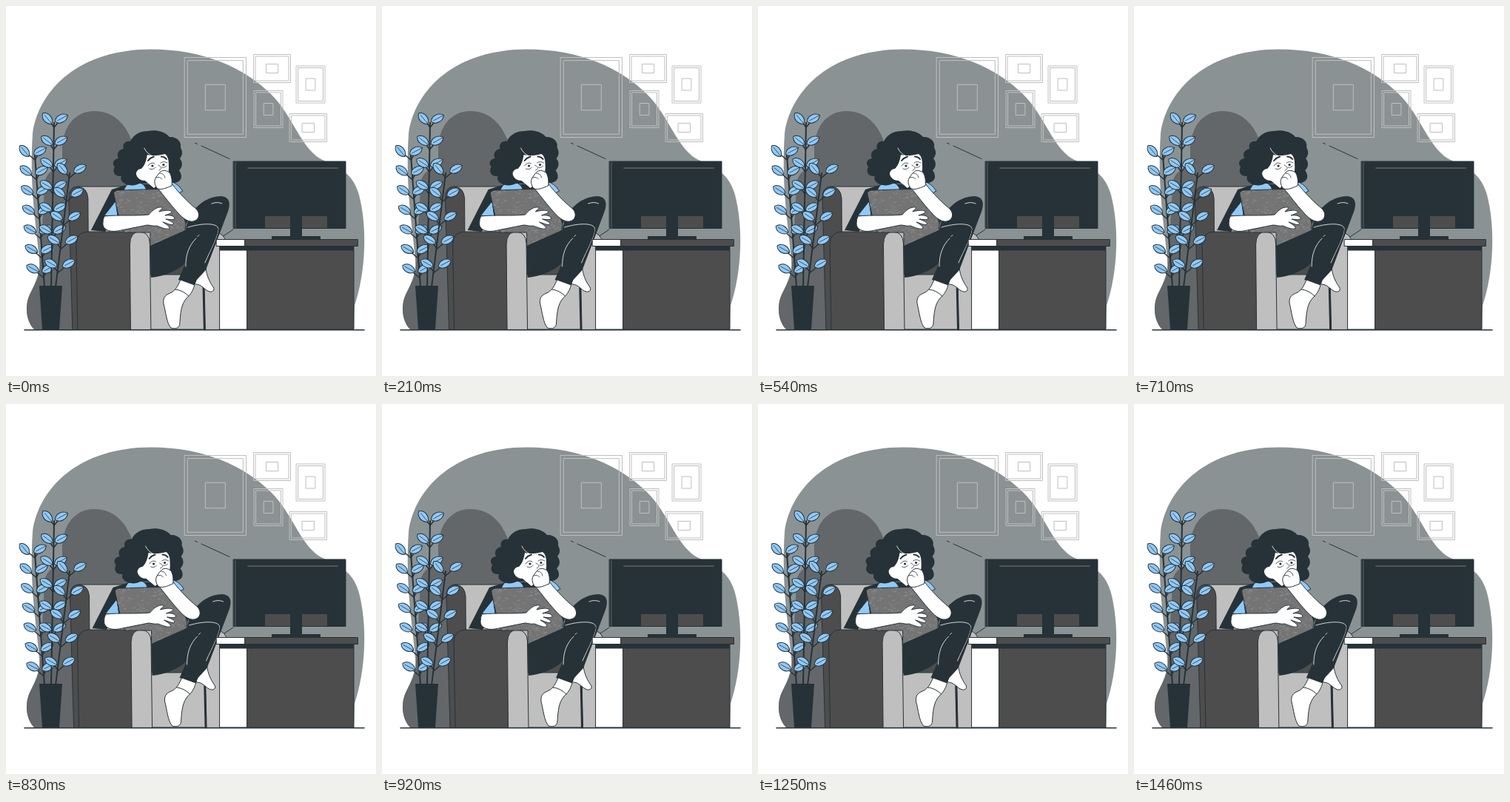
These frames come from a looping animation (500 by 500 pixels, 1.5 s). An HTML page:

```html
<!DOCTYPE html>
<html lang="en">
<head>
<meta charset="utf-8">
<title>Scary film night</title>
<style>
  html, body { margin: 0; height: 100%; overflow: hidden; background: #fff; }
  svg { display: block; width: 100vw; height: 100vh; stroke-linecap: round; stroke-linejoin: round; }
  .ink { fill: #263238; }
  .dark { fill: #4d4d4d; }
  .light { fill: #bfbfbf; }
  .white { fill: #fff; }
  .blue { fill: #90caf9; }
  .edge { stroke: #263238; }
  .line { fill: none; stroke: #263238; }
  .shine { fill: none; stroke: #fff; stroke-width: .8; }
</style>
</head>
<body>
<svg viewBox="0 0 500 500">
  <clipPath id="blobClip"><use href="#blob"/></clipPath>
  <clipPath id="pillowClip"><use href="#pillow"/></clipPath>

  <path id="blob" fill="#8b9294" d="M36 172C45 111 101 58.500 196 58.500C268 58.500 323 84 359 120C387 148 398 190 424 206C447 218 468 223 477 255C488 297 487 357 471 405L470 437H38C27 426 25 405 32 390C41 372 46 362 45 345C42 300 31 250 36 172Z"/>
  <path clip-path="url(#blobClip)" fill="#636769" d="M76 202C74 164 93 142 119 142C149 142 166 164 174 195L190 260V437H20V390C38 372 46 366 46 350L52 245C52 228 61 219 77 219Z"/>
  <g id="pictures" fill="none" stroke="#bfbfbf"></g>
  <path class="line" d="M255.500 185l3 1.500M264 189l38 17.500M307 302l-15 10"/>

  <g id="shaker">
    <g id="chair" class="edge">
      <path class="light" d="M96 244H170L200 300V437H108Z"/>
      <path class="dark" d="M90 437L85 262Q84 244 97 244Q110 245 111 260L112 437Z"/>
      <path class="light" d="M194 358H270V437H194Z"/>
      <path class="dark" d="M194 330H256V363H194Z"/>
      <path class="light" d="M269 437L267 322Q269 306 283 306Q296 307 297 320V437Z"/>
      <path class="line" stroke-width="3" d="M267 372L268.500 437"/>
      <path class="dark" d="M97 437L95 322Q96 305 111 305H181V437Z"/>
      <path class="light" d="M168.500 437L167.500 322Q168 305 181 305Q194 306 194.500 321L196 437Z"/>
    </g>

    <g id="body">
      <path class="ink" d="M143 248L115 303L134 305L150 284L196 306L238 304L246 290L222 240L165 241Z"/>
      <path class="blue edge" d="M148 264L133 283L151 285Z"/>
      <path class="blue edge" d="M159 250C162 239 171 236 179 238C186 240 190 245 190 251Z"/>
      <path class="blue edge" d="M222 237Q232 239 239 250L228 256Z"/>
    </g>

    <g id="head">
      <path class="ink" d="M168 183C173 173 182 169 192 169C202 167 214 169 221 177C230 176 238 183 236 191C239 197 239 201 235 206C240 212 238 219 234 222C240 230 237 238 228 239L180 240C173 244 162 243 157 237C155 235 155 232 156 230C148 231 143 225 147 217C143 213 145 207 152 206C149 199 153 194 159 193C157 187 161 182 168 183Z"/>
      <path class="white" d="M191 201C198 203 208 202 215 200C219 203 220 208 220 214C221 228 217 236 207 240L200 246L188 236C181 236 176 231 176 226C177 222 180 220 183 220C188 215 190 208 191 201Z"/>
      <path class="shine" stroke-width="1.200" d="M187 192Q190 199 198 203"/>
      <path class="line" stroke-width="2" d="M192 209Q195 205 200 203.500M210 203.500Q215 204 217 207"/>
      <path class="line" stroke-width=".8" d="M192 216Q196 210 201 213M194 220Q199 222 202 218M209 212Q213 209 218 212M211 218Q215 219 217 216M206 215C210 217 212 220 207 222"/>
      <circle class="ink" cx="198" cy="216" r="1.600"/>
      <circle class="ink" cx="213" cy="214.500" r="1.600"/>
    </g>

    <path id="pillow" class="edge" fill="#747474" d="M146 255Q145 250 151 249L218 247Q225 247 227 252L243 293Q244 301 238 308L195 328V306H161Q157 305 156 300Z"/>
    <g id="confetti" clip-path="url(#pillowClip)" fill="none" stroke-width=".7"></g>

    <g id="legs">
      <path class="white edge" d="M256 369L270 353C271 365 276 374 281 381C282 386 277 388 271 384C265 379 262 376 256 376Z"/>
      <path class="ink" d="M246 290C255 268 274 257 291 257C302 258 304 266 300 278L270 357L258 370L238 320Z"/>
      <path class="shine" d="M246 299C266 293 286 293 287 301C286 313 277 328 269 347M278 267Q286 264 292 267"/>
      <path class="ink" d="M195 324L240 304C258 295 286 293 287 302C285 316 273 335 267 349L255 377L233 370L243 347C232 358 211 366 196 367Z"/>
      <path class="shine" d="M243 352C243 336 247 324 257 314M259 311.500l2-2"/>
      <path class="white edge" d="M236 370L255 377C252 387 249 390 244 395C237 403 236 414 235 428C235 435 230 437 223 435C217 428 216 413 213 402C212 392 217 390 224 387C230 383 232 379 236 370Z"/>
      <path class="line" d="M229 383Q239 384 247 392"/>
    </g>

    <g id="arms" class="white edge">
      <path d="M224 240C234 253 247 266 257 274C262 279 262 287 256 290C248 294 239 287 232 279C222 268 214 257 205 246Z"/>
      <path d="M205 247C201 243 200 237 202 233C204 230 205 228 208 225C211 221 217 222 221 225C224 229 225 237 224 243C218 245 212 249 205 247Z"/>
      <path class="line" stroke-width=".8" d="M203 232Q208 230 211 234M208 226Q214 226 215 232"/>
      <path d="M133 284C151 282 176 284 193 282C198 276 204 271 211 272C213 274 207 276 207 278C214 276 222 275 224 278C225 280 217 282 215 283C222 282 228 284 228 287C227 290 219 288 216 288C222 290 228 293 226 295C224 297 216 293 212 292C217 295 223 299 220 301C216 302 209 299 204 297C199 298 195 296 191 296L151 304C138 306 131 301 131 294Q131 288 133 284Z"/>
    </g>
  </g>

  <g id="plant">
    <path class="ink" d="M45 378H76L72 437H49Z"/>
  </g>

  <g id="table">
    <path class="white edge" d="M289 325H326V437H289Z"/>
    <path class="dark edge" d="M326 325H470V437H326Z"/>
    <path class="ink" d="M289 325H470V330.500H289Z"/>
    <path class="white edge" d="M284.500 315.500H323V324.500H284.500Z"/>
    <path class="dark edge" d="M323 315.500H475.500V324.500H323Z"/>
  </g>

  <g id="tv">
    <path class="ink" d="M384 298H400V311H425V315H359V311H384Z"/>
    <path class="ink edge" d="M307.500 210H459V300.500H307.500Z"/>
    <path fill="none" stroke="#687074" stroke-width=".8" d="M310 211V300"/>
    <path fill="none" stroke="#555" stroke-width="1.800" d="M327 219H448"/>
    <path class="dark" d="M350 284H384V300H350ZM400 284H434V300H400Z"/>
  </g>
  <path class="line" stroke-width="1.600" d="M25 437.800H484"/>
</svg>

<script>
const $ = id => document.getElementById(id);
const add = (id, markup) => $(id).insertAdjacentHTML('beforeend', markup);

// A wall picture is two nested borders and a centred box a third as large.
function picture(x, y, w, h) {
  const border = Math.max(2.5, w / 20);
  for (const [dx, dy] of [[0, 0], [border, border], [w * .34, h * .34]])
    add('pictures', `<rect x="${x + dx}" y="${y + dy}" width="${w - 2 * dx}" height="${h - 2 * dy}"/>`);
}
picture(241.5, 69.5, 83, 108);
picture(335, 65.5, 49.5, 38);
picture(392.5, 81, 38.5, 50);
picture(335.5, 114.5, 38.5, 50);
picture(383.5, 145.5, 50, 38);

// A stem carries evenly spaced leaf pairs from its tip downwards.
const leaf = (x, y, tilt) => `<g transform="translate(${x} ${y}) rotate(${tilt})">
  <path class="blue edge" d="M-9.500 0C-6-7 5-7 9.500 0C5 7-6 7-9.500 0Z"/>
  <path class="line" stroke-width=".7" d="M-6 0H9"/></g>`;
function stem(tipX, tipY, baseX, pairs, gap, left, right) {
  const baseY = 380;
  add('plant', `<path class="line" stroke-width="2" d="M${tipX} ${tipY + 6}L${baseX} ${baseY}"/>`);
  for (let i = 0; i < pairs; i++) {
    const y = tipY + gap * i, x = tipX + (baseX - tipX) * (y - tipY) / (baseY - tipY);
    const tilt = 24 + 26 / (i + 1);
    add('plant', `<path class="line" stroke-width="1.500" d="M${x - left} ${y}L${x} ${y + 12}L${x + right} ${y}"/>`
      + leaf(x - left, y, tilt) + leaf(x + right, y, -28));
  }
}
stem(39, 196, 52, 7, 26.5, 14, 7);
stem(65, 152, 61, 6, 30, 9, 10);
stem(86, 220, 67, 5, 32, 10, 14);

// Pillow pattern from a seeded generator.
let seed = 7;
const random = () => (seed = seed * 16807 % 2147483647) / 2147483647;
for (let i = 0; i < 300; i++) {
  const x = 144 + 102 * random(), y = 246 + 80 * random(), a = 6.283 * random();
  const dx = 1.8 * Math.cos(a), dy = 1.8 * Math.sin(a);
  add('confetti', `<path stroke="${i % 2 ? '#8a9eae' : '#918680'}" d="M${x} ${y}q${dx} ${dy} ${2 * dx - dy / 2} ${dy}"/>`);
}

// Horizontal tremble: ten equal linear segments per loop, shown at 24 fps.
const LOOP = 1500, FPS = 24, FRAMES = 36;
const offsets = [0, -1, 2, -4, 4, -4, 4, -4, 2, -1, 0];
const start = performance.now();
function draw(now) {
  const t = Math.max(0, now - start) % LOOP;
  const frame = Math.min(FRAMES - 1, Math.floor(t * FPS / 1000 + .1));
  const p = (frame + .5) / FRAMES * 10, i = Math.floor(p);
  const x = offsets[i] + (offsets[i + 1] - offsets[i]) * (p - i);
  $('shaker').setAttribute('transform', `translate(${x.toFixed(2)})`);
  requestAnimationFrame(draw);
}
draw(start);
</script>
</body>
</html>
```
